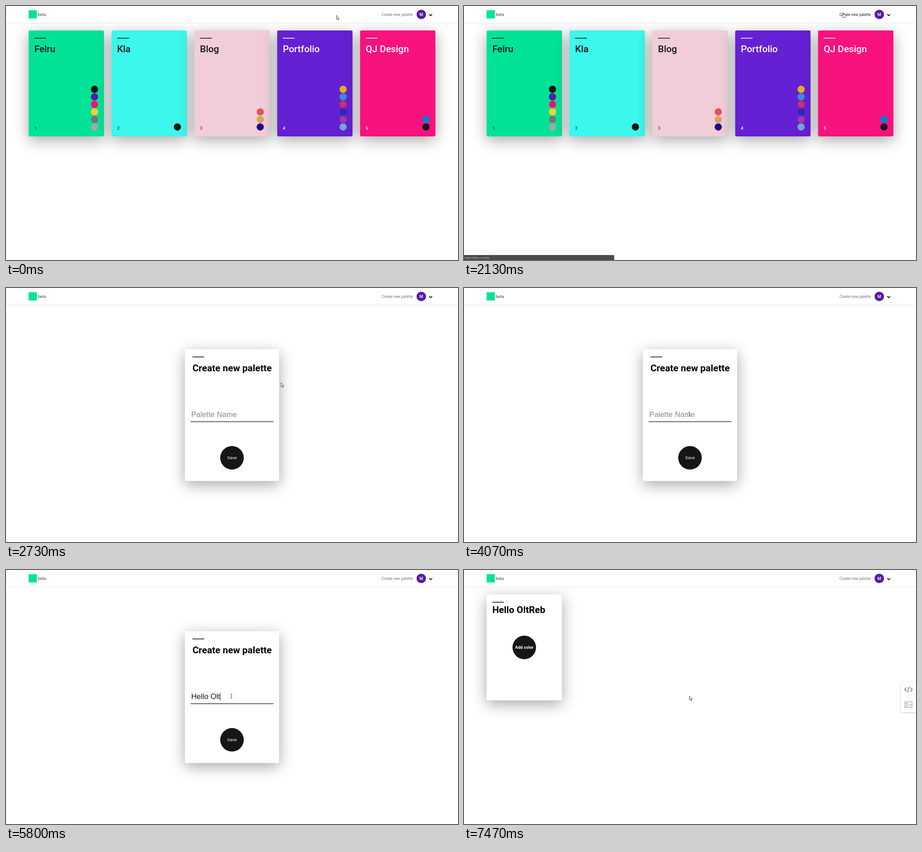
These frames come from a looping animation (998 px wide and 561 px high, 8000 ms). An HTML page with a canvas:

```html
<!DOCTYPE html>
<html lang="en">
<head>
<meta charset="utf-8">
<title>Palette manager</title>
<style>
  html, body { margin: 0; width: 100%; height: 100%; overflow: hidden; background: #fff; }
  canvas { display: block; width: 998px; height: 561px; }
</style>
</head>
<body>
<canvas id="stage" width="998" height="561"></canvas>
<script>
const ctx = document.getElementById('stage').getContext('2d');
const LOOP = 8000;
const TICK = 1000 / 15;
const SCALE = 998 / 1920; // the page is laid out 1920 units wide
const INK = '#151515';
const ROBOTO = 'Roboto, sans-serif';
const ARIAL = '"Liberation Sans", Arial, sans-serif';
const NAME = 'Hello OltReb';

const cards = [
  { name: 'Felru', fill: '#00e396', ink: INK, dots: [INK, '#591aa8', '#ff0a78', '#ffcd2e', '#757575', '#a6a6a6'] },
  { name: 'Kla', fill: '#3bf7ec', ink: INK, dots: [INK] },
  { name: 'Blog', fill: '#f1cdd7', ink: INK, dots: ['#e55353', '#d4a662', '#23008f'] },
  { name: 'Portfolio', fill: '#6520d3', ink: '#fff', dots: ['#e3b01a', '#3b8cd4', '#d02c6e', '#2a2bb5', '#a23aa0', '#72a8cf'] },
  { name: 'QJ Design', fill: '#f7127d', ink: '#fff', dots: ['#0a7bd0', INK] }
];

// Ticks of the scene
const HOVER_ON = 30, HOVER_OFF = 34, STATUS_OFF = 37;
const OPEN_FORM = 33, FOCUS = 53, SAVED = 111, PANEL = 112, BLINK = 8;
const keyTicks = [67, 69, 72, 74, 76, 78, 82, 85, 87, 91, 94, 97];

// Pointer path: tick, x, y in stage pixels
const path = [
  [0, 729.5, 20.6], [9, 729.5, 20.6], [11, 728.6, 20.4], [18, 728.6, 20.4],
  [21, 742, 20], [28, 818, 16.5], [31, 837.3, 14.4], [33, 837.3, 14.4],
  [36, 790, 50], [41, 607.3, 209.3], [44, 497.2, 285], [49, 497.8, 278.6], [120, 497.8, 278.6]
];

function pointer(tick) {
  const i = Math.max(1, path.findIndex(p => p[0] >= tick));
  const [t0, x0, y0] = path[i - 1], [t1, x1, y1] = path[i];
  const u = (tick - t0) / (t1 - t0);
  return [x0 + (x1 - x0) * u, y0 + (y1 - y0) * u];
}

function rect(x, y, w, h, color) {
  ctx.fillStyle = color;
  ctx.fillRect(x, y, w, h);
}

function roundRect(x, y, w, h, radii, color) {
  ctx.beginPath();
  ctx.roundRect(x, y, w, h, radii);
  ctx.fillStyle = color;
  ctx.fill();
}

function circle(x, y, r, color) {
  ctx.beginPath();
  ctx.arc(x, y, r, 0, Math.PI * 2);
  ctx.fillStyle = color;
  ctx.fill();
}

function text(str, x, y, font, color, align = 'left') {
  ctx.font = font;
  ctx.textAlign = align;
  ctx.fillStyle = color;
  ctx.fillText(str, x, y);
}

function line(points, color, width) {
  ctx.beginPath();
  points.forEach(([x, y]) => ctx.lineTo(x, y));
  ctx.strokeStyle = color;
  ctx.lineWidth = width;
  ctx.stroke();
}

function shadowed(blur, dy, alpha, draw) {
  ctx.save();
  ctx.shadowColor = `rgba(0,0,0,${alpha})`;
  ctx.shadowBlur = blur * SCALE;
  ctx.shadowOffsetY = dy * SCALE;
  draw();
  ctx.restore();
}

function sheet(x, y, w, h, color) {
  shadowed(64, 16, 0.35, () => roundRect(x, y, w, h, 6, color));
}

function header(hover) {
  rect(0, 0, 1920, 72, '#fff');
  rect(0, 71.5, 1920, 1.9, '#e4e4e4');
  rect(96, 18, 35, 35, '#00e396');
  text('beta', 134.5, 42.5, `500 18px ${ROBOTO}`, '#666');
  text('Create new palette', 1595, 43, `400 16px ${ROBOTO}`, hover ? '#222' : '#757575');
  circle(1764, 36, 20, '#551aa6');
  text('M', 1764, 43, `500 18px ${ROBOTO}`, '#fff', 'center');
  line([[1798, 35], [1804, 41], [1810, 35]], '#111', 3.6);
}

function list() {
  cards.forEach((card, i) => {
    const x = 96 + 352 * i;
    sheet(x, 104, 320, 450, card.fill);
    rect(x + 24, 135.5, 50, 3, card.ink);
    text(card.name, x + 24, 196, `500 40px ${ROBOTO}`, card.ink);
    text(i + 1, x + 24, 525, `500 18px ${ROBOTO}`, card.ink === INK ? 'rgba(21,21,21,.75)' : '#fff');
    const top = 514 - 32 * (card.dots.length - 1);
    card.dots.forEach((color, n) => circle(x + 280, top + 32 * n, 15.3, color));
  });
}

function form(tick) {
  sheet(760, 260, 400, 560, '#fff');
  rect(792, 291.5, 50, 3, '#111');
  text('Create new palette', 792, 354, `700 40px ${ROBOTO}`, '#000');

  const typed = NAME.slice(0, keyTicks.filter(k => k <= tick).length);
  const font = `32px ${ARIAL}`;
  text(typed || 'Palette Name', 787, 549, font, typed ? INK : '#8a8a8a');
  const last = [FOCUS, ...keyTicks].filter(k => k <= tick).pop();
  if (last !== undefined && Math.floor((tick - last) / BLINK) % 2 === 0) {
    rect(787 + ctx.measureText(typed).width, 520, 1.9, 36, '#444');
  }
  rect(784, 567, 352, 2.4, INK);

  circle(960, 721.5, 50, INK);
  text('Save', 960, 727.5, `18px ${ARIAL}`, '#fff', 'center');
}

function palette(tick) {
  sheet(96, 104, 320, 450, '#fff');
  rect(120, 135.5, 50, 3, '#111');
  text(NAME, 120, 182, `700 40px ${ROBOTO}`, '#000');
  circle(256, 329, 50, INK);
  text('Add color', 256, 335, `700 18px ${ROBOTO}`, '#fff', 'center');
  if (tick >= PANEL) sidePanel();
}

function sidePanel() {
  shadowed(8, 2, 0.22, () => roundRect(1856, 476, 70, 128, [4, 0, 0, 4], '#fff'));
  line([[1880, 499], [1872, 508], [1880, 517]], '#666', 2.8);
  line([[1896, 499], [1904, 508], [1896, 517]], '#666', 2.8);
  line([[1891, 496], [1885, 520]], '#666', 2.8);
  ctx.strokeStyle = '#8a8a8a';
  ctx.lineWidth = 1.9;
  ctx.strokeRect(1873, 560, 30, 24);
  ctx.beginPath();
  ctx.arc(1881, 568, 3, 0, Math.PI * 2);
  ctx.stroke();
  line([[1875, 581], [1882, 574], [1886, 578], [1894, 569], [1902, 578]], '#8a8a8a', 1.9);
}

function statusBar() {
  roundRect(0, 1058, 638, 24, [0, 5, 0, 0], '#4b4b4b');
  text('https://felru.co/new', 3, 1073, '11.4px "Open Sans", sans-serif', '#d6d6d6');
}

const ARROW = new Path2D('M0 0V17L4 13.4L6.6 19.4L9.4 18.2L6.9 12.4H12Z');
const HAND = new Path2D('M-2 1.5Q0 -1.5 2 1.5V8L8 9.5Q10 10 10 13L8.5 21H-2L-7 13Q-7 10 -4.5 11L-2 13Z');

function cursor(tick) {
  const [x, y] = pointer(tick);
  const onLink = tick >= HOVER_ON && tick < HOVER_OFF;
  const onInput = tick >= 44 && tick < SAVED;
  ctx.save();
  ctx.translate(x / SCALE, y / SCALE);
  if (onInput) {
    line([[0, -8], [0, 8]], '#333', 1.7);
    [-8.5, 8.5].forEach(dy => line([[-4, dy], [4, dy]], '#333', 1.6));
  } else {
    const shape = onLink ? HAND : ARROW;
    ctx.fillStyle = '#fff';
    ctx.fill(shape);
    ctx.strokeStyle = '#222';
    ctx.lineWidth = 1.6;
    ctx.stroke(shape);
  }
  ctx.restore();
}

function draw(ms) {
  const tick = Math.floor((ms + 4) / TICK);
  ctx.setTransform(SCALE, 0, 0, SCALE, 0, 0);
  rect(0, 0, 1920, 1080, '#fff');
  if (tick < OPEN_FORM) list();
  else if (tick < SAVED) form(tick);
  else palette(tick);
  header(tick >= HOVER_ON && tick < HOVER_OFF);
  if (tick >= HOVER_ON && tick < STATUS_OFF) statusBar();
  cursor(tick);
}

const start = performance.now();
function loop() {
  draw((performance.now() - start) % LOOP);
  requestAnimationFrame(loop);
}
loop();
</script>
</body>
</html>
```
